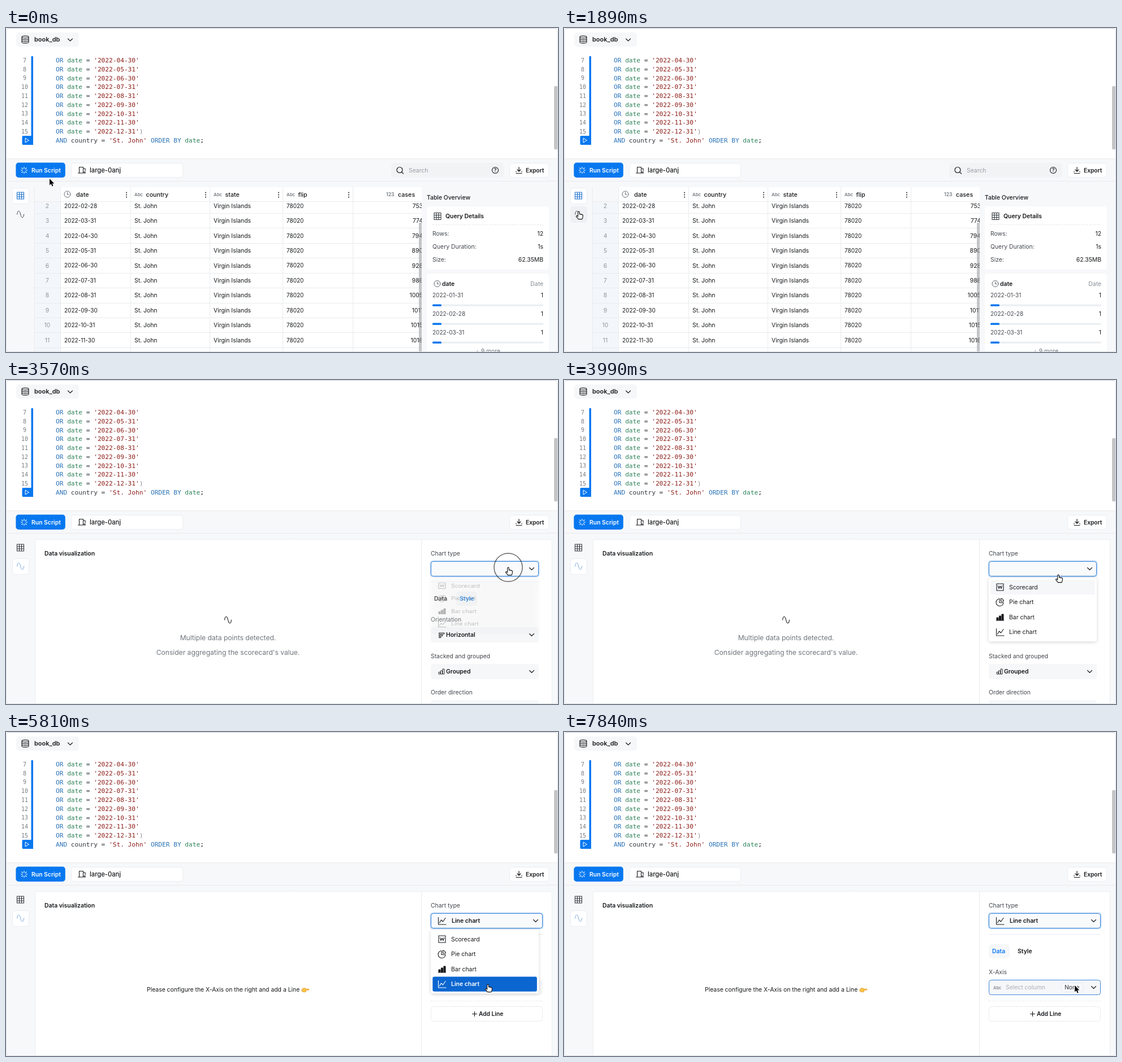
An HTML page with a canvas for the animation above (8 s loop, 976x574 px).

```html
<!DOCTYPE html>
<html lang="en">
<head>
<meta charset="utf-8">
<title>Query to chart</title>
<style>
html, body { margin: 0; width: 100%; height: 100%; overflow: hidden; background: #fff; }
canvas { display: block; }
</style>
</head>
<body>
<canvas id="stage" width="976" height="574"></canvas>
<script>
const ctx = document.getElementById('stage').getContext('2d');
const LOOP = 8000, STEP = 70;
const INK = '#17191c', LABEL = '#43474d', MUTED = '#9aa0a8', BLUE = '#0878f0';
const PAGE = '#f7f8fa', FIELD = '#f6f7f9', LINE = '#e9ebee';
const SANS = 'Inter, "Open Sans", sans-serif';
const MONO = '"DejaVu Sans Mono", "Liberation Mono", monospace';

const clamp = v => Math.max(0, Math.min(1, v));
const ramp = (t, a, b) => clamp((t - a) / (b - a));
const smooth = u => u * u * (3 - 2 * u);

// ---------- drawing helpers ----------
function text(s, x, y, { size = 10.4, weight = 400, color = INK, align = 'left', font = SANS } = {}) {
  ctx.font = `${weight} ${size}px ${font}`;
  ctx.textAlign = align;
  ctx.fillStyle = color;
  ctx.fillText(s, x, y + size * 0.36);
}

function rect(x, y, x2, y2, fill) {
  ctx.fillStyle = fill;
  ctx.fillRect(x, y, x2 - x, y2 - y);
}

function box(x, y, x2, y2, fill, stroke, r = 5, width = 1) {
  const h = stroke ? 0.5 : 0;
  ctx.beginPath();
  ctx.roundRect(x + h, y + h, x2 - x - 2 * h, y2 - y - 2 * h, r);
  if (fill) { ctx.fillStyle = fill; ctx.fill(); }
  if (stroke) { ctx.strokeStyle = stroke; ctx.lineWidth = width; ctx.stroke(); }
}

function icon(d, x, y, stroke, width = 1.1, fill) {
  const p = new Path2D(d);
  ctx.save();
  ctx.translate(x, y);
  ctx.lineCap = ctx.lineJoin = 'round';
  if (fill) { ctx.fillStyle = fill; ctx.fill(p); }
  if (stroke) { ctx.strokeStyle = stroke; ctx.lineWidth = width; ctx.stroke(p); }
  ctx.restore();
}

function hline(x, x2, y, color = LINE, dash = []) {
  ctx.setLineDash(dash);
  ctx.beginPath();
  ctx.moveTo(x, y + 0.5);
  ctx.lineTo(x2, y + 0.5);
  ctx.strokeStyle = color;
  ctx.lineWidth = 1;
  ctx.stroke();
  ctx.setLineDash([]);
}

// Icons are drawn around their own centre.
const GRID = 'M-6-6H6V6H-6ZM-2-6V6M2-6V6M-6-2H6M-6 2H6';
const WAVE = 'M-6 0C-5-8-1.5-7.5 0 0S5 8 6 0';
const CHEVRON = 'M-4-2L0 2L4-2';
const CLOCK = 'M5.5 0A5.5 5.5 0 1 1-5.5 0A5.5 5.5 0 1 1 5.5 0M0-3V.5H2.5';
const SPARK = 'M0-5.5V-3M0 3V5.5M-5.5 0H-3M3 0H5.5M-4-4L-2.4-2.4M4-4L2.4-2.4M-4 4L-2.4 2.4M4 4L2.4 2.4';
const PIE = 'M-1-6A6.5 6.5 0 1 0 6 1H-1ZM1.5-6.5A6 6 0 0 1 6.5-1.5H1.5Z';
const BARS = 'M-6 1H-3V5H-6ZM-1.5-2H1.5V5H-1.5ZM3-5H6V5H3ZM-6.5 6H6.5';
const TREND = 'M-6.5-6V6.5H7M-4.5 3.5L-1.5-1.5L1.5 1.5L6-5';
const CARD = 'M-6-6H6V6H-6ZM-3.5-2.5L-2 2.5L0-2L2 2.5L3.5-2.5';
const DB = 'M-6-4.5C-6-7 6-7 6-4.5S-6-2-6-4.5V4.5C-6 7 6 7 6 4.5V-4.5M-6-1.5C-6 1 6 1 6-1.5M-6 1.5C-6 4 6 4 6 1.5';
const ARROW = 'M0 0V11.6L2.7 9L4.6 13.4L6.5 12.6L4.6 8.4H8.3Z';
const HAND = 'M-1.3 1Q0-.8 1.3 1L1.5 5Q3 4 4 5.4Q5.4 4.7 6.1 6Q7.5 5.6 7.5 7.2L7 11L6 13.6H-.6L-4.4 8.8Q-4.7 7-2.8 7.6L-1.3 9Z';

// ---------- always visible ----------
function editor() {
  rect(0, 0, 976, 232, '#fff');
  box(18, 8, 129, 33, FIELD);
  icon(DB, 34, 20.5, INK);
  text('book_db', 50, 20.5, { size: 11, weight: 600 });
  icon(CHEVRON, 113.5, 21, INK);

  const key = '#2a73b9', col = '#2e8259', str = '#8c1d18', plain = '#33373c';
  const code = (parts, y) => {
    let x = 88;
    for (const [s, color] of parts) {
      text(s, x, y, { size: 11.17, color, font: MONO });
      x += ctx.measureText(s).width;
    }
  };
  for (let i = 0; i < 9; i++) {
    const y = 57.3 + i * 15.72, month = i + 4;
    const day = [4, 6, 9, 11].includes(month) ? 30 : 31;
    text(String(i + 7), 33, y, { size: 10, color: '#777c83', align: 'center', font: MONO });
    code([['OR ', key], ['date ', col], ['= ', plain],
      [`'2022-${String(month).padStart(2, '0')}-${day}'`, str], [month > 11 ? ')' : '', '#8b8f95']], y);
  }
  code([['AND ', key], ['country = ', plain], ["'St. John' ", str], ['ORDER BY ', key], ['date', col], [';', INK]], 198.8);
  rect(44.5, 50, 48, 207, BLUE);
  box(28.5, 191, 48, 207, BLUE, null, 2);
  icon('M-2.5-3.8L3.5 0L-2.5 3.8Z', 37, 199, '#fff', 1);
  box(969, 103, 976, 215, '#c4c5c7', null, 2);
}

function toolbar(search) {
  rect(0, 231, 976, 574, PAGE);
  hline(0, 976, 231);
  hline(0, 976, 271);
  box(17.4, 238.5, 104.8, 265, BLUE);
  icon(SPARK, 32, 252, '#fff', 1.2);
  text('Run Script', 45, 252, { weight: 600, color: '#fff' });
  box(115, 239, 313, 265, '#fff', '#eceef1');
  icon('M-4 4V-5.5H3V5M-6 5H2.5M3-3H6.5V1', 133.5, 252, INK);
  icon('M2 0A2 2 0 1 1-2 0A2 2 0 1 1 2 0', 139, 256, null, 1, '#5c6066');
  text('large-0anj', 148, 252, { size: 11.2, weight: 500 });
  if (search) {
    box(681, 239, 880, 265, '#f1f3f5');
    icon('M5 0A5 5 0 1 1-5 0A5 5 0 1 1 5 0M3.8 3.8L6.5 6.5', 696, 251.5, INK, 1.2);
    text('Search', 712, 252, { color: MUTED });
    icon('M5.5 0A5.5 5.5 0 1 1-5.5 0A5.5 5.5 0 1 1 5.5 0', 865, 252, INK);
    text('?', 865, 252, { size: 8.5, weight: 600, align: 'center' });
  }
  box(890, 239, 960, 265, '#fff', '#eceef1');
  icon('M0-5.5V2M-3-1L0 2L3-1M-5 2V3M5 2V3M-5 5.5H5', 907, 252, INK, 1.2);
  text('Export', 919, 252, { weight: 600, size: 10.2 });
}

function sidebar(t, chart) {
  const y = chart ? 316 : 283;
  box(11, y, 41, y + 29, '#fff', '#e9edf2');
  if (!chart) {
    ctx.globalAlpha = ramp(t, 770, 1050);
    box(11, 316, 41, 345, '#eef0f4');
    ctx.globalAlpha = 1;
  }
  icon(GRID, 25.5, 297, chart ? '#33373d' : '#1b70cf');
  icon(WAVE, 25.7, 330, chart ? '#6f9fd8' : '#33373d', 1);
}

// ---------- table view ----------
function table() {
  const cases = [753, 774, 794, 890, 928, 986, 1005, 1011, 1015, 1016];
  const ends = [28, 31, 30, 31, 30, 31, 31, 30, 31, 30];
  const edges = [97, 221, 361, 490, 614];
  ctx.save();
  ctx.beginPath();
  ctx.rect(50, 282, 685, 292);
  ctx.clip();
  rect(97, 282, 735, 574, '#fff');
  rect(51, 307, 97, 574, '#f3f7fb');
  cases.forEach((n, i) => {
    const y = 315 + i * 26.45, row = i + 2;
    text(String(row), 73, y, { color: '#8f969f', align: 'center' });
    text(`2022-${String(row).padStart(2, '0')}-${ends[i]}`, 103, y, { size: 10 });
    text('St. John', 227, y);
    text('Virgin Islands', 367, y);
    text('78020', 496, y, { size: 10 });
    text(String(n), 737, y, { align: 'right' });
    hline(51, 735, Math.round(y + 12.8));
  });
  rect(97, 282, 735, 307, '#fff');
  rect(51, 282, 97, 307, PAGE);
  hline(51, 735, 307);
  for (const x of edges) rect(x - 1, 282, x, 574, LINE);
  rect(50, 282, 51, 574, LINE);

  const kind = { size: 7.8, weight: 600, color: '#777d85' }, head = { size: 10.7, weight: 500 };
  icon(CLOCK, 108.5, 294.5, '#5d636b', 1);
  text('date', 124, 295, head);
  [['country', 227], ['state', 367], ['flip', 496]].forEach(([s, x]) => {
    text('Abc', x, 295, kind);
    text(s, x + 20.5, 295, head);
  });
  text('123', 672, 295, { ...kind, size: 8.6 });
  text('cases', 693, 295, head);
  for (const x of [213, 353, 482, 606])
    for (const d of [-4, 0, 4]) box(x - 1, 294.5 + d, x + 1, 296.5 + d, INK, null, 1);
  rect(730, 345, 735, 574, 'rgba(150,152,156,.55)');
  ctx.restore();
}

function overview() {
  text('Table Overview', 744, 300, { weight: 500 });
  box(744, 316, 960, 428, '#fff');
  icon(GRID, 763, 333.5, '#33373d');
  text('Query Details', 777, 333, { weight: 600 });
  hline(754, 950, 348, '#e3e6ea', [3, 2]);
  [['Rows:', '12'], ['Query Duration:', '1s'], ['Size:', '62.35MB']].forEach(([k, v], i) => {
    text(k, 754, 364 + i * 23, { color: LABEL });
    text(v, 950, 364 + i * 23, { align: 'right' });
  });
  box(744, 435, 960, 590, '#fff');
  icon(CLOCK, 762.5, 453, '#5d636b', 1);
  text('date', 771, 453, { weight: 600 });
  text('Date', 950, 453, { color: '#858b93', align: 'right' });
  ['01-31', '02-28', '03-31'].forEach((d, i) => {
    const y = 473 + i * 33;
    text('2022-' + d, 754, y, { color: LABEL, size: 10 });
    text('1', 950, y, { align: 'right' });
    box(754, y + 16.5, 950, y + 20, '#eceff2', null, 1.5);
    box(754, y + 16.5, 770, y + 20, BLUE, null, 1.5);
  });
  text('+ 9 more', 852, 572, { color: '#6d737b', align: 'center' });
}

// ---------- chart view ----------
function field(y, right, label) {
  box(751, y, right, y + 27, FIELD);
  icon(CHEVRON, right - 12.5, y + 13.5, INK);
  if (label) text(label, 778, y + 13.5, { weight: 600 });
}

function tabs(y, active) {
  if (active) box(796, y - 12, 833, y + 13, FIELD);
  else box(751, y - 12, 788, y + 13, FIELD);
  text('Data', 757, y, { weight: 600, color: active ? INK : BLUE });
  text('Style', 802, y, { weight: 600, color: active ? BLUE : INK });
}

function chartType(t, right) {
  if (t >= 3570) {
    box(749.3, 319.3, right + 1.7, 349.7, '#cfe2f9', null, 6);
    box(751, 321, right, 348, '#f9fafc', '#2f80d8', 4);
    icon(CHEVRON, right - 12.5, 334.5, INK);
  } else field(321, right);
}

function pointing(x, y) {
  icon('M-5-2Q-3-4 0-3.2L1-1.8H6.5Q7.5-.8 6.5 .2H1.5L1.5 3Q0 4.2-3 3.6L-6 2.5V-1Z', x, y, '#d9962a', 0.7, '#fbc346');
}

function chartView(t, lines) {
  box(51, 282, 966, 590, '#fff', '#eceef1', 4);
  rect(734, 282, 735, 574, LINE);
  text('Data visualization', 68, 307.5, { weight: 600 });
  text('Chart type', 751, 307, { color: LABEL });
  const right = lines ? 949 : 942;
  chartType(t, right);
  hline(751, right, lines ? 358 : 357);
  tabs(lines ? 388 : 387, !lines);
  if (lines) lineForm(t);
  else styleForm();
}

function styleForm() {
  icon(WAVE, 392.5, 425, INK);
  const note = { size: 12.1, color: '#70757c', align: 'center' };
  text('Multiple data points detected.', 392.5, 456.5, note);
  text("Consider aggregating the scorecard's value.", 392.5, 483, note);
  text('Orientation', 751, 424, { color: LABEL });
  field(438, 942, 'Horizontal');
  icon('M-4-4H5V-2H-4ZM-4-.5H2V1.5H-4ZM-4 3H-1V4.5H-4Z', 770, 452, INK, 0.9);
  text('Stacked and grouped', 751, 489, { color: LABEL });
  field(503, 942, 'Grouped');
  icon('M-4.5 1H-2V4.5H-4.5ZM-1-1.5H1.5V4.5H-1ZM2.5-4.5H5V4.5H2.5Z', 770, 516.5, INK, 0.9);
  text('Order direction', 751, 553, { color: LABEL });
  field(567, 942);
}

function lineForm(t) {
  text('Please configure the X-Axis on the right and add a Line', 249, 456.5);
  pointing(529, 457);
  icon(TREND, 771, 334.5, INK);
  text('Line chart', 788, 334, { weight: 600 });
  text('X-Axis', 751, 425, { color: LABEL });
  field(439, 949);
  if (t >= 6720) box(751, 439, 949, 466, null, '#3f86d6', 4);
  text('Abc', 759, 453, { size: 7.4, weight: 600, color: '#858b93' });
  text('Select column', 781, 452.5, { color: '#a9aeb6' });
  box(879, 444, 918, 461, '#f7f8fa', '#e8eaee', 3);
  text('None', 885, 452.5, { color: '#33373d' });
  hline(751, 949, 476, '#e6e8ec', [3, 2]);
  box(751, 486, 949, 513, '#fff', '#e9ebee');
  icon('M-4 0H4M0-4V4', 828.5, 499.5, INK, 1.2);
  text('Add Line', 836, 499.5, { weight: 600, size: 10.2 });
}

function menu(t, y) {
  const shown = Math.min(ramp(t, 3500, 3780), 1 - ramp(t, 5810, 6090));
  if (!shown) return;
  const picked = t >= 5810;
  const hot = picked ? 3 : Math.max(0, Math.min(3, Math.floor((y - 354) / 26.5)));
  ctx.save();
  ctx.globalAlpha = shown;
  ctx.translate(0, 350);
  ctx.scale(1, 0.8 + 0.2 * shown);
  ctx.translate(0, -350);
  ctx.save();
  ctx.shadowColor = 'rgba(0,0,0,.16)';
  ctx.shadowBlur = 6;
  ctx.shadowOffsetY = 1;
  box(751, 350, 942, 463.5, '#fff', null, 4);
  ctx.restore();
  const items = [['Scorecard', CARD], ['Pie chart', PIE], ['Bar chart', BARS], ['Line chart', TREND]];
  items.forEach(([name, d], i) => {
    const cy = 367 + i * 26.5, on = picked && i === 3, color = on ? '#fff' : INK;
    if (i === hot) box(754.3, cy - 13, 938.8, cy + 13.3, on ? '#0b66d0' : FIELD, null, 3);
    icon(d, 771, cy, color, 1.1, d === BARS ? color : null);
    text(name, 787, cy, { color, weight: on ? 600 : 400 });
  });
  ctx.restore();
}

function tooltip(t) {
  if (t < 2030 || t >= 3150) return;
  ctx.globalAlpha = Math.min(ramp(t, 1960, 2100), 1 - ramp(t, 2940, 3150));
  box(56, 316, 104, 344, '#000', null, 4);
  text('Chart', 79.5, 330, { color: '#fff', align: 'center' });
  ctx.globalAlpha = 1;
}

// ---------- pointer ----------
const path = [
  [0, 77, 267], [70, 76, 263], [210, 76, 263], [700, 24, 322], [840, 26, 325], [2870, 26, 325],
  [2940, 49, 320], [3220, 888, 332], [3640, 888, 332], [3920, 874, 345], [4200, 874, 345],
  [5040, 853, 446], [5110, 852, 447], [6020, 852, 447], [6090, 848, 446], [6580, 848, 446],
  [7350, 891, 449], [7630, 891, 449], [7840, 903, 449], [LOOP, 903, 449]
];
const clicks = [[1610, 1820], [3500, 3710], [5390, 5600]];

function pointerAt(t) {
  const i = path.findIndex(p => p[0] > t);
  const [a, ax, ay] = path[i - 1], [b, bx, by] = path[i];
  const u = smooth(ramp(t, a, b));
  return [ax + (bx - ax) * u, ay + (by - ay) * u];
}

function pointer(t, x, y) {
  if (clicks.some(([a, b]) => t >= a && t < b)) {
    ctx.beginPath();
    ctx.arc(x, y, 25, 0, Math.PI * 2);
    ctx.strokeStyle = 'rgba(40,40,40,.7)';
    ctx.lineWidth = 1.5;
    ctx.stroke();
  }
  const hand = (t >= 840 && t < 2940) || (t >= 3220 && t < 6090);
  if (hand) icon(HAND, x, y, '#111', 1.1, '#fff');
  else {
    icon(ARROW, x, y, '#fff', 2);
    icon(ARROW, x, y, null, 1, '#000');
  }
}

function draw(t) {
  const chart = t >= 1960;
  const [x, y] = pointerAt(t);
  editor();
  toolbar(!chart);
  sidebar(t, chart);
  if (chart) {
    chartView(t, t >= 5810);
    menu(t, y);
  } else {
    table();
    overview();
  }
  tooltip(t);
  box(0, 0, 976, 574, null, '#dde1e7', 4);
  hline(3, 973, 0, '#cbd1da');
  pointer(t, x, y);
}

function tick() {
  draw(Math.floor((performance.now() % LOOP) / STEP) * STEP);
  requestAnimationFrame(tick);
}
tick();
</script>
</body>
</html>
```
